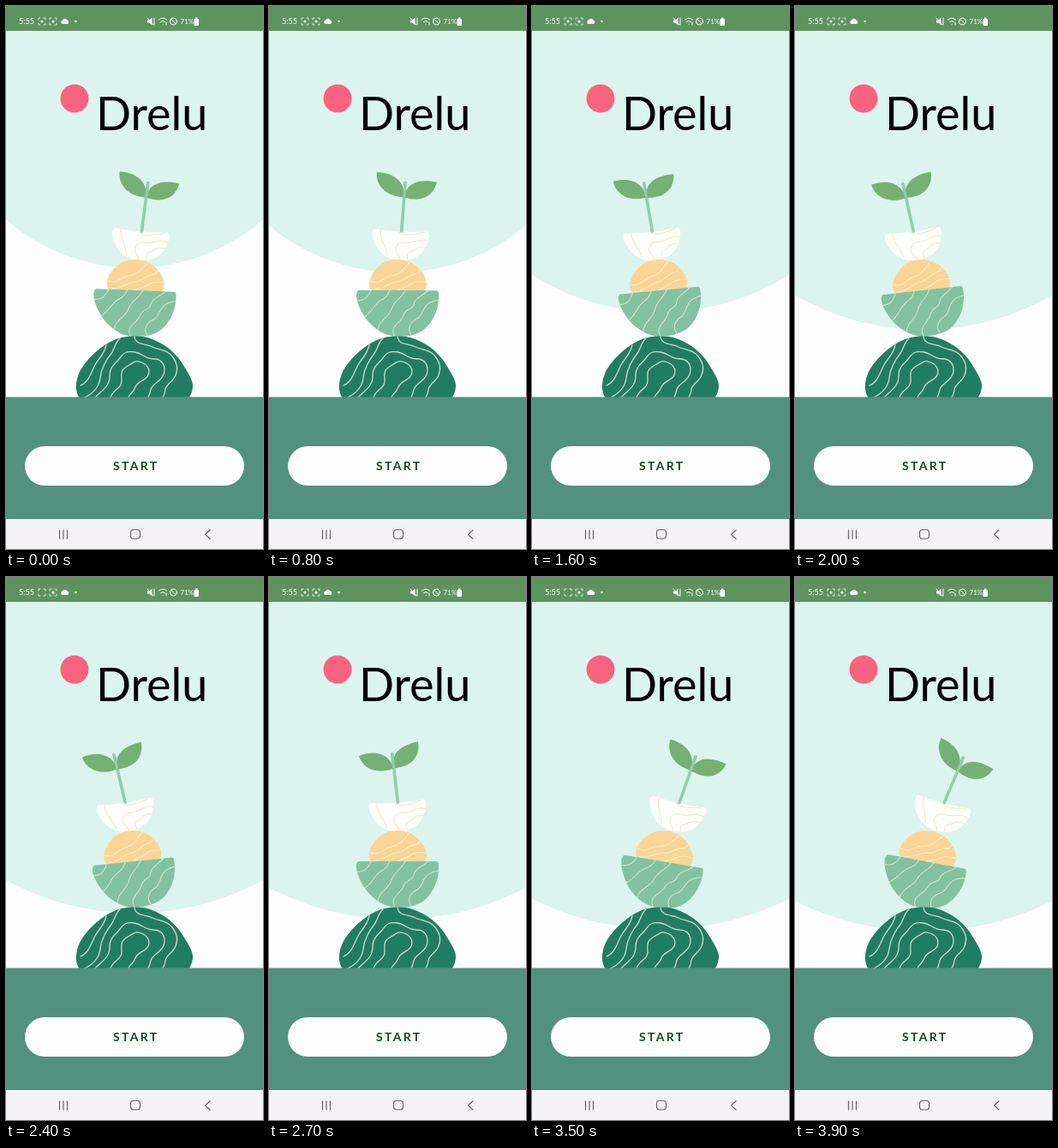
Recreate the animation shown at these times as an HTML page. Size 300 by 634 pixels, loop 4 s.

```html
<!DOCTYPE html>
<html lang="en">
<head>
<meta charset="utf-8">
<title>Stacked stones</title>
<style>
  html, body { margin: 0; width: 100%; height: 100%; overflow: hidden; background: #fefdfe; }
  svg { display: block; width: 300px; height: 634px; }
  text { font-family: Lato, "Open Sans", sans-serif; }
  .line { fill: none; stroke-linecap: round; stroke-linejoin: round; }
</style>
</head>
<body>
<svg viewBox="0 0 300 634">
  <circle id="sky" cx="150" cy="78" r="227" fill="#dcf4ee"/>
  <rect width="300" height="29" fill="#5e9360"/>

  <!-- status bar -->
  <g fill="#fff" stroke="none">
    <text x="15" y="21" font-size="9">5:55</text>
    <g class="line" stroke="#fff" stroke-width=".8">
      <path id="bracket" d="M38 16v-2h2m4 0h2v2m0 4v2h-2m-4 0h-2v-2"/>
      <use href="#bracket" x="13"/>
    </g>
    <circle id="recording" cx="42" cy="18" r="1.6"/>
    <circle cx="55" cy="18" r="1.6"/>
    <path d="M66 21a2.3 2.3 0 0 1 0-4.5a3 3 0 0 1 5.5 0a2.3 2.3 0 0 1 0 4.500z"/>
    <circle cx="81.5" cy="18" r="1.3"/>
    <path d="M165 16.500h2.500l3-3v9l-3-3h-2.500z"/>
    <g class="line" stroke="#fff">
      <path d="M165 14l7 8M173 14v8M178.5 16q4.500-4 9 0M180.500 18.500q2.500-2 5 0M183 21.300h.2M187 19v3"/>
      <circle cx="195.5" cy="18" r="4"/>
      <path d="M192.7 15.2l5.600 5.600"/>
    </g>
    <text x="203.5" y="21" font-size="8">71%</text>
    <rect x="219.5" y="15" width="5.500" height="8" rx="1"/>
    <rect x="221" y="13.500" width="2.500" height="2"/>
  </g>

  <!-- title -->
  <circle cx="80" cy="108" r="16.5" fill="#f9637f"/>
  <text x="105" y="145" font-size="54">Drelu</text>

  <!-- sprout and upper stones -->
  <g id="white">
    <path d="M-31-16Q0-13 31-16C35-15 33-4 28 5C22 15 12 19 0 19C-12 19-22 14-28 4C-33-4-36-15-31-16z" fill="#fffefe"/>
    <g class="line" stroke="#fae3c3" stroke-width="1.1">
      <path d="M-24-15C-25-6-19 0-17 6S-15 10-15 14M32-5C21-9 16-1 6-2S-8 5-4 11S0 16 0 18M29 3C20 0 16 7 11 9S9 14 9 17M-3-14C4-8 18-13 27-15"/>
    </g>
    <g id="stem">
      <path class="line" d="M0 0V-57" stroke="#8fceae" stroke-width="3.6"/>
      <g id="leaves" fill="#76b074">
        <path d="M0 0C-20 3-35-8-36-24C-18-26-2-20 0 0z"/>
        <path d="M0 0C0-17 14-24 35-23C34-7 22 4 0 0z"/>
      </g>
      <path class="line" d="M0-41V-57" stroke="#8fceae" stroke-width="3"/>
    </g>
  </g>
  <g id="green">
    <path d="M-30-17C-36-24-33-33-26-42C-18-51-10-54 0-54C12-54 21-49 28-40C34-32 36-25 31-17z" fill="#fbd596"/>
    <g class="line" stroke="#fdedd2" stroke-width="1.1">
      <path d="M-32-28C-19-24-17-34-7-35S8-45 14-51M-28-19C-15-19-10-27-1-28S12-36 19-37S24-41 26-42M-2-17C4-21 10-21 15-25S26-29 33-28"/>
    </g>
    <path d="M-45-18H46Q48-18 48-13C49-2 45 13 35 24C27 33 14 36 0 36C-14 36-28 27-37 15C-44 5-49-7-48-14Q-47-18-45-18z" fill="#82c2a1"/>
    <g class="line" stroke="#dfe3cb">
      <path d="M-48-6C-39-5-34-10-31-18M-38 13C-29 7-27-2-20-6S-11-13-9-18M-23 29C-22 17-10 14-7 4S4-8 9-18M-3 36C-10 24 4 20 7 11S18 5 19-2S28-11 36-18M16 34C10 25 17 18 23 15S29 4 34-1S43-6 48-7"/>
    </g>
  </g>

  <!-- base stone -->
  <path d="M86 458C80 450 81 438 86 427C95 410 113 396 124 391C136 385 155 384 168 388C185 394 197 404 205 416C213 429 219 438 218 445Q217 453 213 458z" fill="#217d61"/>
  <g class="line" stroke="#cfd8c8" stroke-width="1.3">
    <path d="M87 443C97 439 99 428 104 419S114 408 117 396M104 457C113 448 121 444 121 432S128 418 133 411S141 403 150 404S161 412 172 412S187 421 184 430S171 440 169 448S167 454 166 457M122 457C125 447 136 447 135 436S136 424 144 419S152 414 158 416S169 424 166 431S154 437 151 445S145 451 143 457M150 386C151 396 163 394 171 398S188 401 194 409S201 423 198 431S187 441 186 448S184 454 183 457M92 457C102 452 109 444 110 434S117 413 122 407S127 393 133 388"/>
  </g>

  <!-- ground, button and navigation -->
  <rect y="456.5" width="300" height="142.5" fill="#52917e"/>
  <rect x="22" y="514" width="256" height="46" rx="23" fill="#fefdfe"/>
  <text x="125" y="542" font-size="14" font-weight="700" letter-spacing="2.3" fill="#0f4a1e">START</text>
  <rect y="599" width="300" height="35" fill="#f4f2f4"/>
  <g class="line" stroke="#666" stroke-width="1.2">
    <path d="M62.5 612v10M67 612v10M71.5 612v10M238 612l-5.500 5l5.500 5"/>
    <rect x="145.5" y="611.5" width="11" height="10.5" rx="3.5"/>
  </g>
</svg>
<script>
const $ = id => document.getElementById(id);
const LOOP = 4, STEP = 0.1;
const SWING_START = 0.6, SWING = 1.7;
const GROW_START = 0.52, GROW = 3.8;

const bezier = (u, a, b) => 3 * a * u * (1 - u) ** 2 + 3 * b * u * u * (1 - u) + u ** 3;

// cubic-bezier(.25, .1, .25, 1), solved by bisection
function ease(x) {
  if (x <= 0) return 0;
  if (x >= 1) return 1;
  let lo = 0, hi = 1;
  for (let i = 0; i < 24; i++) {
    const mid = (lo + hi) / 2;
    if (bezier(mid, 0.25, 0.25) < x) lo = mid; else hi = mid;
  }
  return bezier(lo, 0.1, 1);
}

// Eased swing through four poses, SWING seconds apart; upper parts lag behind.
function sway(t, lag, poses) {
  const pos = (t - lag - SWING_START) / SWING + 1;
  const i = Math.max(0, Math.min(2, Math.floor(pos)));
  return poses[i] + (poses[i + 1] - poses[i]) * ease(pos - i);
}

function place(id, x, y, angle) {
  $(id).setAttribute('transform', `translate(${x} ${y}) rotate(${angle})`);
}

function draw(t) {
  const phase = (t - GROW_START) / GROW;
  const grow = phase < 0 ? 1 - ease(1 + phase) : ease(phase);
  $('sky').setAttribute('r', 226.5 + 110 * grow);

  const tilt = sway(t, 0.15, [15, 3, -8.5, 15]);
  const stem = tilt * 1.55;
  const leaf = sway(t, 0.33, [17, 8.5, -15.5, 32]);
  place('green', 150, 350, sway(t, 0, [10.5, 1.3, -6.5, 10.5]));
  place('white', sway(t, 0, [170, 155.5, 139.5, 170]), 278, tilt);
  place('stem', 0.5, -15, stem - tilt);
  place('leaves', 0, -40, leaf - stem);

  const blink = t % 1;
  $('recording').style.opacity = blink > 0.05 && blink < 0.55 ? 0 : 1;
}

function frame() {
  const t = performance.now() / 1000 % LOOP;
  draw(Math.floor(t / STEP) * STEP);
  requestAnimationFrame(frame);
}
frame();
</script>
</body>
</html>
```
